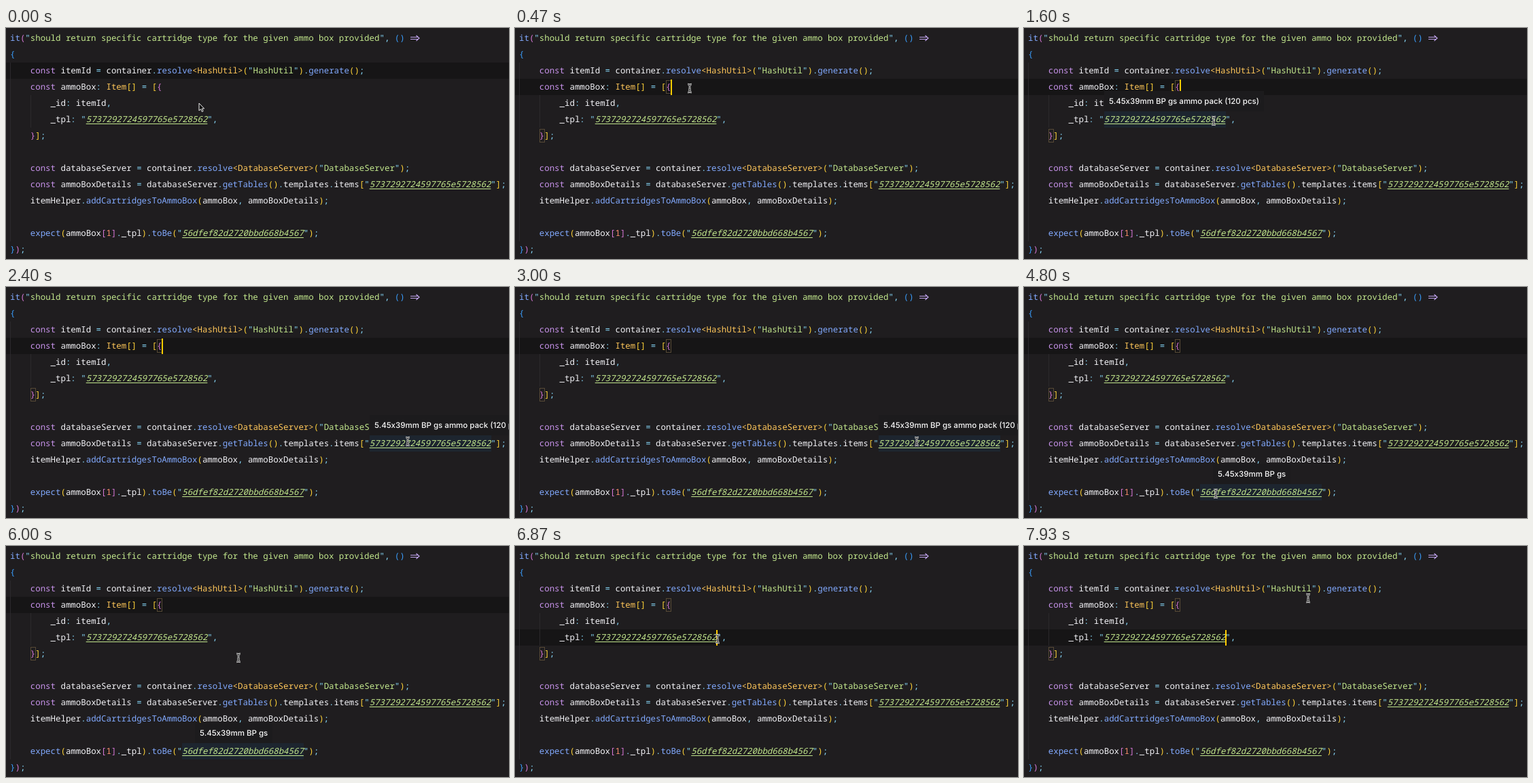
These frames come from a looping animation (740x341 px, 8000 ms). An HTML page:

```html
<!DOCTYPE html>
<html lang="en">
<head>
<meta charset="utf-8">
<title>Code editor hover</title>
<style>
  html, body { margin: 0; width: 100%; height: 100%; overflow: hidden; background: #1f1d1f; }
  #stage { position: relative; width: 740px; height: 341px; overflow: hidden; }
  #stage > * { position: absolute; }
  pre {
    margin: 0; left: 6px; top: 3px; color: #f4f4f8;
    font: 500 12.42px/24px "Noto Sans Mono", monospace;
    font-variant-ligatures: none; text-rendering: geometricPrecision;
  }
  .keyword { color: #c792ea; }
  .call { color: #82aaff; }
  .type { color: #ffc75a; }
  .number { color: #f78c6c; }
  .mark { color: #89ddff; }
  .string, .id { color: #c3e88d; }
  .id { font-style: italic; text-decoration: underline 1px; text-underline-offset: 2px; text-decoration-skip-ink: none; }
  .depth0 { color: #ffd338; }
  .depth1 { color: #d678d6; }
  .depth2 { color: #3a9dfc; }
  #activeLine { left: 0; width: 740px; height: 24px; background: #161516; }
  #word { height: 24px; background: #1d252f; }
  .guide { width: 1px; background: #2b292c; }
  .pair { width: 8px; height: 20px; box-sizing: border-box; border: 1px solid #574a36; }
  #caret { width: 2px; height: 23px; background: #ffcc00; }
  #tip {
    height: 30px; padding: 0 7px; background: #1c1b1d; color: #f8f8f8; white-space: nowrap;
    font: 500 11.5px/30px Inter, sans-serif; text-rendering: geometricPrecision;
  }
  svg { left: 0; top: 0; }
</style>
</head>
<body>
<div id="stage">
  <div id="activeLine"></div>
  <div class="guide" style="left:6px;top:51px;height:264px"></div>
  <div class="guide" style="left:36px;top:99px;height:48px"></div>
  <div id="word"></div>
  <pre id="code"></pre>
  <div class="pair" style="left:222px;top:77px"></div>
  <div class="pair" style="left:36px;top:149px"></div>
  <div id="caret"></div>
  <div id="tip"></div>
  <svg width="740" height="341" fill="none">
    <path d="M595 13.5H606M595 16.5H606M603.5 11L608 15L603.5 19" stroke="#c3a6f0" stroke-width="1.2"/>
    <path id="arrow" d="M0 0V11L2.6 8.7L4.3 12.6L6.1 11.8L4.4 8H7.6Z" fill="#111" stroke="#eee"/>
    <g id="beam">
      <path d="M-3 -6Q0 -6 0 -4Q0 -6 3 -6M0 -4V4M-3 6Q0 6 0 4Q0 6 3 6M-2 2H2" stroke="#eee" stroke-width="2.6"/>
      <path d="M-3 -6Q0 -6 0 -4Q0 -6 3 -6M0 -4V4M-3 6Q0 6 0 4Q0 6 3 6M-2 2H2" stroke="#222" stroke-width="1"/>
    </g>
  </svg>
</div>
<script>
const LOOP = 8000, ADVANCE = 7.452, LINE = 24;
const FIRST_CLICK = 250, SECOND_CLICK = 6800;
const $ = id => document.getElementById(id);
const columnX = column => 6 + column * ADVANCE;
const lineY = line => 3 + LINE * (line - 1);

const source = `it("should return specific cartridge type for the given ammo box provided", ()
{
    const itemId = container.resolve<HashUtil>("HashUtil").generate();
    const ammoBox: Item[] = [{
        _id: itemId,
        _tpl: "5737292724597765e5728562",
    }];

    const databaseServer = container.resolve<DatabaseServer>("DatabaseServer");
    const ammoBoxDetails = databaseServer.getTables().templates.items["5737292724597765e5728562"];
    itemHelper.addCartridgesToAmmoBox(ammoBox, ammoBoxDetails);

    expect(ammoBox[1]._tpl).toBe("56dfef82d2720bbd668b4567");
});`;

function addToken(text, kind) {
  const span = document.createElement("span");
  span.textContent = text;
  span.className = kind;
  $("code").append(span);
}

function highlight(text) {
  let depth = 1;
  for (const [token, call] of text.matchAll(/"[^"]*"|(\w+)(?=[(<])|\w+|\s+|./g)) {
    if (token[0] === '"') {
      const body = token.slice(1, -1);
      addToken('"', "mark");
      addToken(body, /^[\da-f]{24}$/.test(body) ? "id" : "string");
      addToken('"', "mark");
    } else if (/[([{]/.test(token)) addToken(token, "depth" + depth++ % 3);
    else if (/[)\]}]/.test(token)) addToken(token, "depth" + --depth % 3);
    else if (token === "const") addToken(token, "keyword");
    else if (/^[A-Z<>]/.test(token)) addToken(token, "type");
    else if (/^\d+$/.test(token)) addToken(token, "number");
    else if (call) addToken(token, "call");
    else addToken(token, /[.,:;=]/.test(token) ? "mark" : "");
  }
}
highlight(source);

// Pointer stops: time, x, y
const pointerPath = [
  [0, 284, 111], [100, 284, 111], [250, 257, 89], [700, 257, 89], [1100, 279, 137],
  [1850, 279, 137], [2200, 591, 228], [3050, 591, 228], [3550, 393, 305], [3700, 393, 305],
  [4100, 282, 305], [5800, 282, 305], [6000, 342, 165], [6500, 298, 137],
  [6950, 298, 137], [7500, 418, 77], [8000, 418, 77]
];

const ammoPack = "5.45x39mm BP gs ammo pack (120 pcs)";
const hovers = [
  { from: 1300, to: 1900, line: 6, column: 15, x: 118, text: ammoPack },
  { from: 2350, to: 3100, line: 10, column: 71, x: 535, text: ammoPack },
  { from: 4350, to: 6060, line: 13, column: 34, x: 278, text: "5.45x39mm BP gs" }
];

function pointerAt(t) {
  const i = pointerPath.findIndex(stop => stop[0] > t);
  const [t0, x0, y0] = pointerPath[i - 1], [t1, x1, y1] = pointerPath[i];
  const p = (t - t0) / (t1 - t0), ease = p * p * (3 - 2 * p);
  return [x0 + (x1 - x0) * ease, y0 + (y1 - y0) * ease];
}

function place(element, x, y) {
  element.style.left = x + "px";
  element.style.top = y + "px";
}

function show(element, visible) {
  element.style.visibility = visible ? "visible" : "hidden";
}

function draw(t) {
  const focused = t >= FIRST_CLICK, moved = t >= SECOND_CLICK;
  const line = moved ? 6 : focused ? 4 : 3;
  place($("activeLine"), 0, lineY(line));

  place($("caret"), Math.floor(columnX(moved ? 39 : 30)), lineY(line) + 1);
  const sinceClick = t - (moved ? SECOND_CLICK : FIRST_CLICK);
  show($("caret"), focused && sinceClick % 1000 < 500);
  document.querySelectorAll(".pair").forEach(pair => show(pair, focused));

  const hover = hovers.find(h => t >= h.from && t < h.to);
  show($("tip"), hover);
  show($("word"), hover);
  if (hover) {
    $("tip").textContent = hover.text;
    place($("tip"), hover.x, lineY(hover.line) - 30);
    place($("word"), columnX(hover.column), lineY(hover.line));
    $("word").style.width = 24 * ADVANCE + "px";
  }

  const [x, y] = pointerAt(t);
  for (const id of ["arrow", "beam"]) $(id).setAttribute("transform", `translate(${x} ${y})`);
  show($("arrow"), !focused);
  show($("beam"), focused);
}

function tick() {
  draw(performance.now() % LOOP);
  requestAnimationFrame(tick);
}
tick();
</script>
</body>
</html>
```
